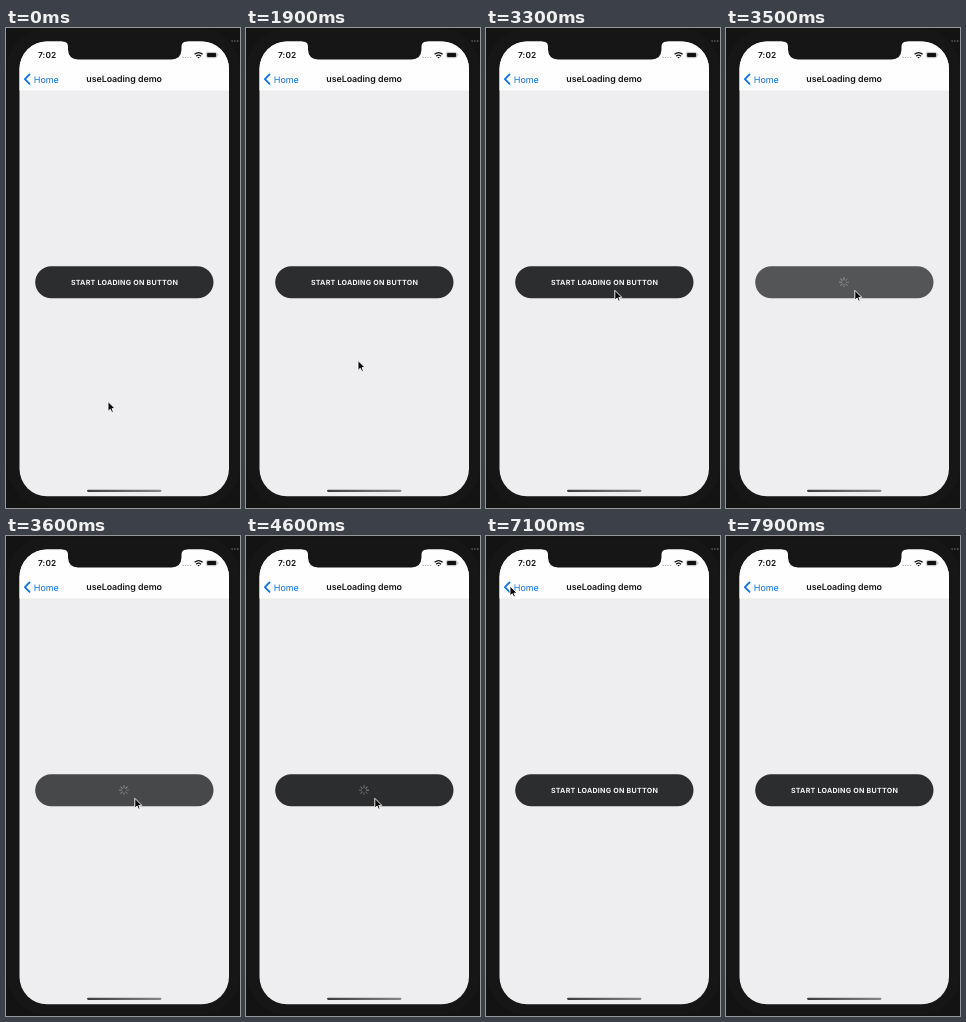
These frames come from a looping animation (234 by 480 pixels, 8000 ms). An HTML page:

```html
<!DOCTYPE html>
<html lang="en">
<head>
<meta charset="utf-8">
<title>useLoading demo</title>
<style>
  html, body { margin: 0; width: 100%; height: 100%; overflow: hidden; background: #131314; }
  svg { display: block; width: 100vw; height: 100vh; }
  text { font-family: Inter, Roboto, "Liberation Sans", sans-serif; text-rendering: geometricPrecision; }
</style>
</head>
<body>
<svg viewBox="0 0 234 480">
  <defs>
    <clipPath id="screen"><rect x="13.500" y="13.500" width="209.500" height="454.800" rx="27.500"/></clipPath>
    <linearGradient id="bar">
      <stop offset="0" stop-color="#3c3c3e"/>
      <stop offset="1" stop-color="#858587"/>
    </linearGradient>
  </defs>

  <rect width="234" height="480" fill="#131314"/>
  <rect x="1" y=".5" width="233" height="478.500" rx="40" fill="#161617"/>
  <path d="M225.500 13h8.500" stroke="#999" stroke-width="1.200" stroke-dasharray="1.200 1.600"/>

  <g clip-path="url(#screen)">
    <rect x="13" y="13" width="211" height="456" fill="#eeedef"/>
    <rect x="13" y="13" width="211" height="49.500" fill="#fefefe"/>
  </g>
  <path d="M56 12V13.500C60 13.500 62 15 62 19V21.500Q62.500 31.400 72 31.400H165.500Q175 31.400 175.500 21.500V19C175.500 15 177.500 13.500 181.500 13.500V12Z" fill="#161617"/>

  <text x="32" y="30.300" font-size="8.300" font-weight="600" letter-spacing=".12" fill="#111">7:02</text>
  <path d="M176.500 29.500h9" stroke="#b5b5b8" stroke-width="1.200" stroke-dasharray="1.300 1.200"/>
  <g fill="none" stroke="#111" stroke-width="1.300">
    <path d="M188.600 26.300Q192.600 22.900 196.600 26.300M190.200 28.200Q192.600 26.200 195 28.200"/>
    <path d="M191.300 29.100L192.600 30.400L193.900 29.100Z" fill="#111" stroke="none"/>
  </g>
  <rect x="200.400" y="24.300" width="10.400" height="5.400" rx="1.600" fill="#ddd" stroke="#999" stroke-width=".5"/>
  <rect x="201.100" y="25" width="9" height="4" rx=".9" fill="#111"/>
  <path d="M211.800 26.200v1.600" stroke="#999" stroke-width=".7"/>

  <path d="M23.500 46.400L18.900 51.100L23.500 55.800" fill="none" stroke="#0c72e4" stroke-width="1.800" stroke-linecap="round" stroke-linejoin="round"/>
  <text x="27.800" y="54.500" font-size="9" letter-spacing="-.08" fill="#0f74e0">Home</text>
  <text x="118.100" y="54.400" font-size="8.900" font-weight="600" letter-spacing="-.05" text-anchor="middle" fill="#161616">useLoading demo</text>

  <g id="button">
    <rect x="29.200" y="238.200" width="178.300" height="32.100" rx="16.050" fill="#2b2d2f"/>
    <text id="label" x="118.500" y="256.800" font-size="7.100" font-weight="700" letter-spacing=".25" text-anchor="middle" fill="#f5f5f5">START LOADING ON BUTTON</text>
    <g id="spinner" transform="translate(118 254.200)"></g>
  </g>
  <rect x="81" y="461.700" width="74.500" height="2.300" rx="1.150" fill="url(#bar)"/>

  <path id="cursor" d="M0 0V9.900L2.300 7.800L3.800 11L5.400 10.300L4 7.200L7 7Z" fill="#080808" stroke="#fff" stroke-width=".9" stroke-linejoin="round"/>
</svg>
<script>
const LOOP = 8000, TICK = 100, BLADES = 8;
const get = id => document.getElementById(id);
const button = get('button'), label = get('label'), spinner = get('spinner'), cursor = get('cursor');

// Keyframes: time, then values
const path = [
  [1800, 102, 373.5], [1900, 112, 332.5], [2100, 121, 304], [2300, 126, 287],
  [2400, 126, 287], [3300, 128.8, 262.3], [6800, 128.8, 262.3],
  [6900, 108, 219], [7000, 64, 127], [7100, 24, 50], [7200, 10, 30],
  [7300, 10, 30], [7500, 2, 23]
];
const fade = [[3300, 1], [3400, .85], [3500, .79], [3600, .86], [3800, 1]];

function sample(keys, t) {
  const next = keys.findIndex(k => k[0] >= t);
  if (next < 0) return keys[keys.length - 1].slice(1);
  if (next === 0) return keys[0].slice(1);
  const a = keys[next - 1], b = keys[next];
  const p = (t - a[0]) / (b[0] - a[0]);
  return a.slice(1).map((v, i) => v + (b[i + 1] - v) * p);
}

const blades = Array.from({ length: BLADES }, (_, i) => {
  const blade = document.createElementNS('http://www.w3.org/2000/svg', 'path');
  blade.setAttribute('d', 'M0 -2.400V-4.600');
  blade.setAttribute('transform', `rotate(${i * 360 / BLADES})`);
  blade.setAttribute('stroke', '#98989a');
  blade.setAttribute('stroke-width', '1');
  blade.setAttribute('stroke-linecap', 'round');
  spinner.append(blade);
  return blade;
});

function draw(time) {
  const t = Math.floor((time % LOOP) / TICK) * TICK;
  const loading = t >= 3500 && t < 5500;
  label.style.display = loading ? 'none' : '';
  spinner.style.display = loading ? '' : 'none';
  button.setAttribute('opacity', sample(fade, t)[0]);

  const step = (t - 3500) / TICK - (t >= 4500 ? 1 : 0);
  blades.forEach((blade, i) => {
    const age = (((step - i) % BLADES) + BLADES) % BLADES;
    blade.setAttribute('opacity', .85 - age * .06);
  });

  const [x, y] = sample(path, t);
  cursor.setAttribute('transform', `translate(${x} ${y})`);
  cursor.style.display = t > 7500 ? 'none' : '';
}

const start = performance.now();
function frame() {
  draw(performance.now() - start);
  requestAnimationFrame(frame);
}
frame();
</script>
</body>
</html>
```
